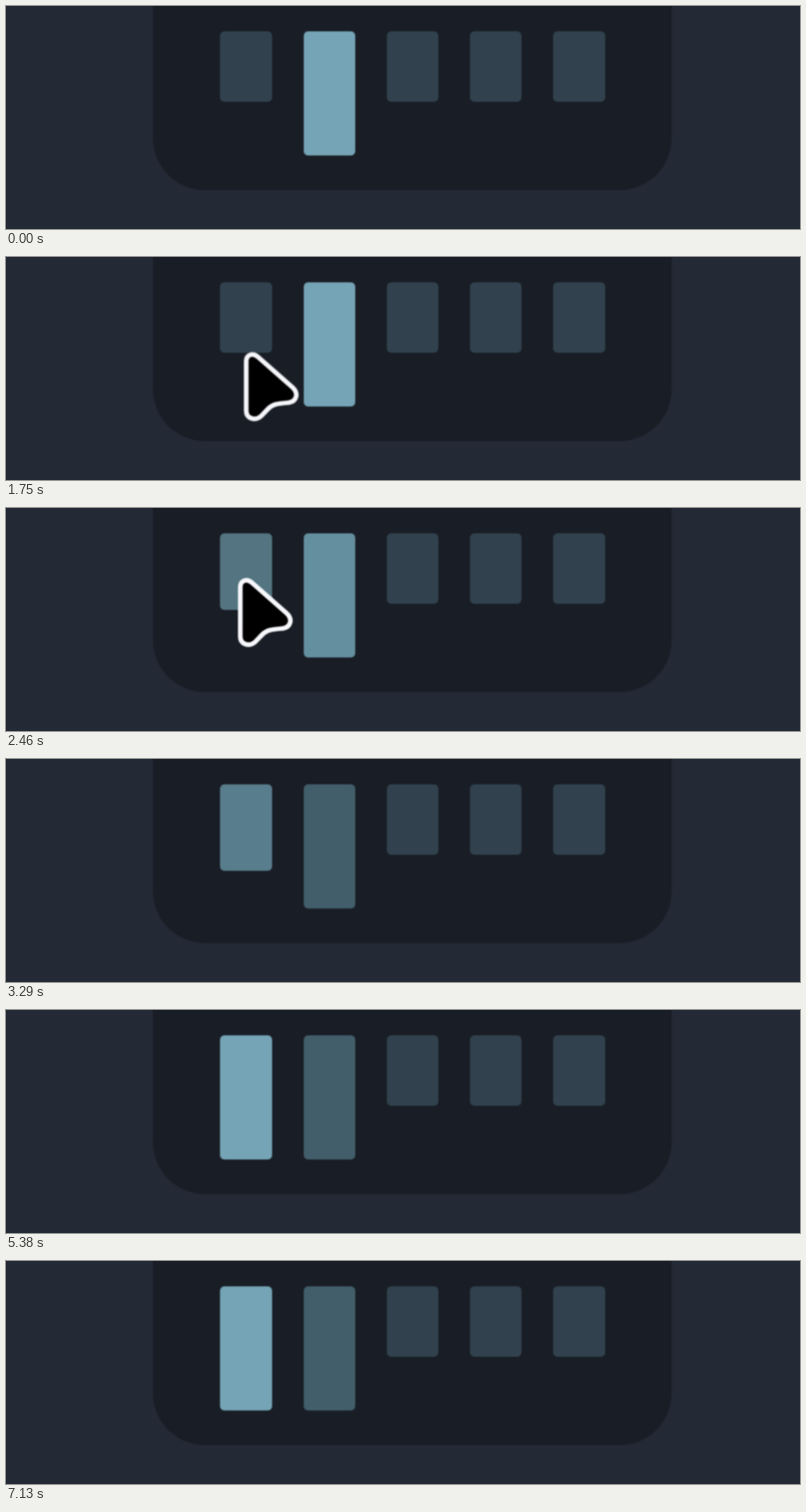
Recreate the animation shown at these times as an HTML page. Size 1280 px wide and 361 px high, loop 8 s.

```html
<!DOCTYPE html>
<html lang="en">
<head>
<meta charset="utf-8">
<title>Bar selection</title>
<style>
  html, body { margin: 0; width: 100%; height: 100%; overflow: hidden; background: #242936; }

  .stage { position: relative; width: 1280px; height: 361px; overflow: hidden; }

  .panel {
    position: absolute; left: 237px; top: -100px; width: 836px; height: 398px;
    border-radius: 84px; background: #191d25; filter: blur(1.3px);
  }

  .bar {
    position: absolute; top: 141px; left: calc(108.3px + var(--i) * 134.2px);
    width: 83.5px; height: 114px; border-radius: 7px; background: #31424e;
  }

  .next { animation: grow 8s infinite linear; }
  .prev { height: 201px; animation: fade 8s infinite linear; }

  .cursor {
    position: absolute; left: 0; top: 0; overflow: visible;
    filter: blur(1.1px); animation: point 8s infinite linear;
  }

  /* hover, press, pause part-way, then finish growing */
  @keyframes grow {
    0%, 22% { height: 114px; background: #31424e; }
    24% { background: #4b626c; }
    28.75% { height: 114px; background: #4d666f; }
    30.75% { height: 124px; background: #537480; animation-timing-function: ease-out; }
    35%, 61.5% { height: 140px; background: #587d8c; animation-timing-function: ease-out; }
    67.25%, 100% { height: 201px; background: #74a4b5; }
  }

  @keyframes fade {
    0%, 28.75% { background: #74a4b5; }
    30.75% { background: #648f9f; animation-timing-function: ease-out; }
    35%, 100% { background: #425e6b; }
  }

  @keyframes point {
    0%, 11% { transform: translate(40px, 215px); animation-timing-function: cubic-bezier(.25, .6, .3, 1); }
    19.25%, 21.5% { transform: translate(0, 0); animation-timing-function: ease-in-out; }
    24% { transform: translate(-10px, -27px); animation-timing-function: ease-out; }
    27.5%, 32% { transform: translate(-10px, -42px); animation-timing-function: ease-in-out; }
    40.5%, 100% { transform: translate(30px, 215px); }
  }
</style>
</head>
<body>
<div class="stage">
  <div class="panel">
    <div class="bar next" style="--i:0"></div>
    <div class="bar prev" style="--i:1"></div>
    <div class="bar" style="--i:2"></div>
    <div class="bar" style="--i:3"></div>
    <div class="bar" style="--i:4"></div>
  </div>
  <svg class="cursor" width="1280" height="361">
    <path fill="#000" stroke="#f7f8fc" stroke-width="7.5" stroke-linejoin="round"
      d="M387.7 170C387.7 159 398 156 406 162.5L462 212C473 222 469 235 456 237C439 238.5 431 239 423 247L411.5 259C402 267 387.7 263 387.7 250Z"/>
  </svg>
</div>
</body>
</html>
```
